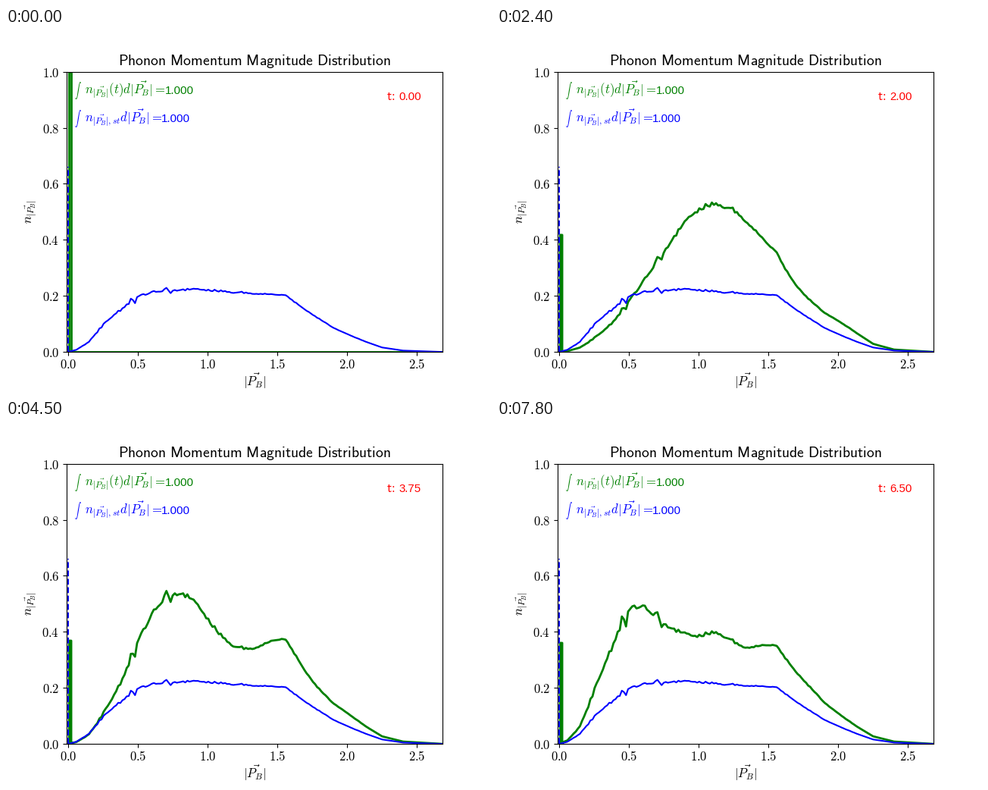
A matplotlib script that plays this animation: 640 by 480 pixels, repeating every 8 s.

```python
import numpy as np
import matplotlib.pyplot as plt
from matplotlib.animation import FuncAnimation

plt.rcParams["mathtext.fontset"] = "cm"

FRAME_MS, LOOP_MS, STEP_MS = 100, 8000, 300
DX = 0.015
STATIONARY_WEIGHT = 0.66

x = np.arange(180) * DX


def stationary_density():
    """Outline through key points, four sharp bumps and fading bin noise."""
    outline = [(0, 0), (0.06, 0.008), (0.15, 0.036), (0.27, 0.108),
               (0.42, 0.168), (0.5, 0.198), (0.62, 0.216), (0.9, 0.224),
               (1.2, 0.213), (1.56, 0.202), (1.7, 0.150), (1.9, 0.086),
               (2.0, 0.064), (2.13, 0.037), (2.25, 0.016), (2.4, 0.005),
               (2.69, 0)]
    n = np.interp(x, *zip(*outline))
    for center, height in [(0.45, 0.012), (0.48, -0.013),
                           (0.7, 0.013), (0.73, -0.01)]:
        n += height * np.exp(-((x - center) / 0.012)**2)
    noise = np.random.default_rng(4).normal(size=x.size)
    return n * (1 + 0.02 * np.exp(-x / 1.2) * noise)


stationary = stationary_density()
norm = (1 - STATIONARY_WEIGHT) / (stationary.sum() * DX)


def density(t):
    """Each momentum swings, damped, around 1.71 times its stationary value."""
    phase = (0.33 + 1.33 * x**2) * t
    swing = np.exp(-0.19 * phase - 0.015 * t) * np.cos(0.69 * phase)
    lift = (0.14 + 0.0057 * t**2) * np.exp(-((phase - 8.2) / 2.4)**2)
    return stationary * (1.71 * (1 - swing) + lift * (t > 0))


def evolving_curve(t):
    n = density(t)
    weight = 1 - norm * n.sum() * DX
    left, right = 0.008, 0.023
    return (np.r_[left, left, right, right, x[2:]],
            np.r_[0, weight, weight, 0, n[2:]])


fig, ax = plt.subplots(figsize=(6.4, 4.8), dpi=100)
ax.set(xlim=(-0.01, 2.683), ylim=(0, 1))
ax.xaxis.set_major_formatter("${x:.1f}$")
ax.yaxis.set_major_formatter("${x:.1f}$")
ax.tick_params(labelsize=12)
ax.tick_params(axis="x", pad=2.2)
ax.set_title(r"$\mathsf{Phonon\ Momentum\ Magnitude\ Distribution}$",
             fontsize=14.2)
ax.set_xlabel(r"$|\vec{P_B}|$", fontsize=12, labelpad=-0.5)
ax.set_ylabel(r"$n_{|\vec{P_B}|}$", fontsize=12, labelpad=3)

evolving, = ax.plot([], [], color="green", lw=2)
ax.plot(x, stationary, color="blue", lw=1.5)
ax.plot([0, 0], [0, STATIONARY_WEIGHT], color="blue", lw=1.5, ls="--")


def label(px, y, text, color, size=12):
    return ax.text((px - 80) / 496, y, text, color=color, fontsize=size,
                   transform=ax.transAxes)


def number(px, y, text, color):
    value = label(px, y, text, color, size=10.8)
    value.set_fontfamily("Liberation Sans")
    return value


def integral(y, integrand, value_px, color):
    label(90, y + 0.006, r"$\int$", color, size=6)
    label(103.5, y, rf"${integrand}d|\vec{{P_B}}|=$", color)
    number(value_px, y, "1.000", color)


integral(0.92, r"n_{|\vec{P_B}|}(t)", 210, "green")
integral(0.82, r"n_{|\vec{P_B}|,st}", 205, "blue")
label(501.6, 0.9, r"$\mathsf{t\!:}$", "red")
clock = number(518, 0.9, "", "red")


def update(frame):
    t = 0.25 * (frame * FRAME_MS // STEP_MS)
    evolving.set_data(*evolving_curve(t))
    clock.set_text(f"{t:.2f}")
    return evolving, clock


anim = FuncAnimation(fig, update, frames=LOOP_MS // FRAME_MS,
                     interval=FRAME_MS, repeat=True, repeat_delay=0)
plt.show()
```
